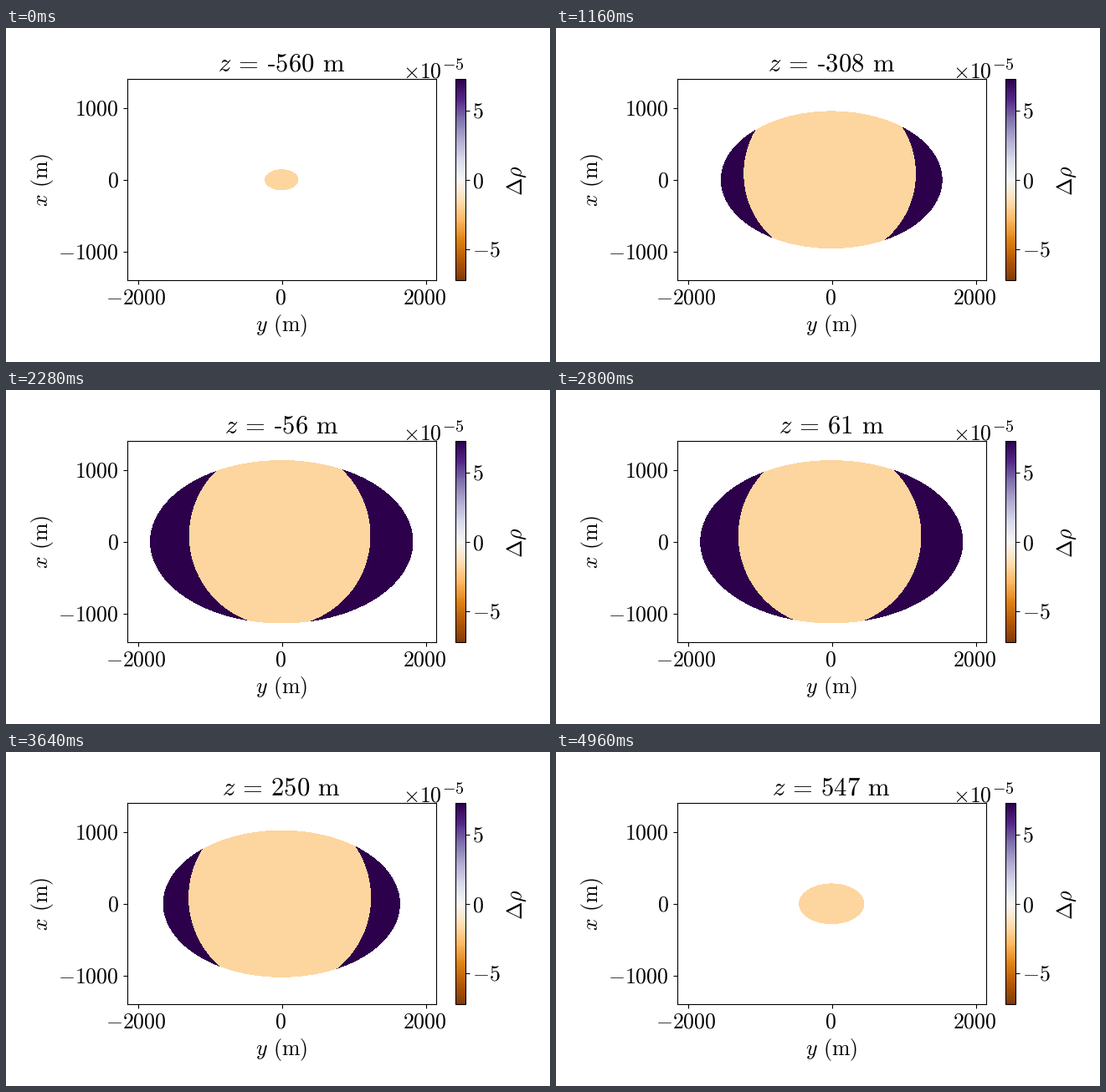
Recreate the animation shown at these times as a matplotlib script. Size 650x400 px, loop 5000 ms.

```python
import numpy as np
import matplotlib.pyplot as plt
from matplotlib.animation import FuncAnimation

W, H, DPI = 650, 400, 100
FRAMES, INTERVAL = 125, 40
Z_START, Z_STEP = -560, 9

AXES = (145.4, 61.2, 369, 241)        # left, top, width, height in pixels
BAR = (537.4, 61.2, 12, 241)
Y_LIM, X_LIM = 2150, 1400             # metres
BODY = (1841, 1141, 564.6)            # semi-axes along y, x, z
CORE = (-25, 86, 130)                 # centre along y, x, z
CORE_R = 1276
V_MAX = 7.25e-5
LIGHT, DARK = -1.85e-5, V_MAX
TEXT, TITLE, EXPONENT = 18.6, 22.1, 14.4

plt.rcParams["mathtext.fontset"] = "cm"
fig = plt.figure(figsize=(W / DPI, H / DPI), dpi=DPI, facecolor="white")


def add_axes(box):
    left, top, w, h = box
    return fig.add_axes((left / W, 1 - (top + h) / H, w / W, h / H))


def label(x, y, text, ha="center", size=TEXT, rotation=0):
    """Put text with its baseline at a pixel position measured from the top."""
    return fig.text(x / W, 1 - y / H, f"${text}$", ha=ha, va="baseline",
                    fontsize=size, rotation=rotation, rotation_mode="anchor")


def rm(text):
    return rf"\mathrm{{{text}}}"


def title_text(z):
    number = str(z).replace("-", "\u2010")
    return (r"z\hspace{0.18}=\hspace{0.18}" + rm(number)
            + r"\hspace{0.38}" + rm("m"))


yy, xx = np.meshgrid((np.arange(738) + 0.5) / 738 * 2 * Y_LIM - Y_LIM,
                     (np.arange(482) + 0.5) / 482 * 2 * X_LIM - X_LIM)
body_dist = (yy / BODY[0]) ** 2 + (xx / BODY[1]) ** 2
core_dist = (yy - CORE[0]) ** 2 + (xx - CORE[1]) ** 2


def density(z):
    """Density difference on the slice at height z; NaN outside the body."""
    in_core = core_dist + (z - CORE[2]) ** 2 <= CORE_R ** 2
    in_body = body_dist + (z / BODY[2]) ** 2 <= 1
    return np.where(in_body, np.where(in_core, LIGHT, DARK), np.nan)


ax = add_axes(AXES)
image = ax.imshow(density(Z_START), cmap="PuOr", vmin=-V_MAX, vmax=V_MAX,
                  origin="lower", interpolation="nearest", aspect="auto",
                  extent=(-Y_LIM, Y_LIM, -X_LIM, X_LIM))
ax.set_xticks([-2000, 0, 2000], labels=[""] * 3)
ax.set_yticks([-1000, 0, 1000], labels=[""] * 3)

bar = fig.colorbar(image, cax=add_axes(BAR))
bar.set_ticks([-5e-5, 0, 5e-5], labels=[""] * 3)

for x, text in ((155.8, "-2000"), (328, "0"), (500, "2000")):
    label(x, 330.3, rm(text))
for y, text in ((104.5, "1000"), (190.5, "0"), (276.5, "-1000")):
    label(135, y, rm(text), ha="right")
for y, text in ((107.5, "5"), (191, "0"), (274, "-5")):
    label(557.3, y, rm(text), ha="left")

unit = r"\hspace{0.38}" + rm("(m)")
label(329, 362.6, "y" + unit)
label(50, 182, "x" + unit, rotation=90)
label(617, 183, r"\Delta\rho", rotation=90)
label(473.5, 60, r"\times" + rm("10"), ha="left")
label(548, 50, rm("-5"), ha="right", size=EXPONENT)
title = label(329, 51.5, title_text(Z_START), size=TITLE)


def update(frame):
    z = Z_START + Z_STEP * max(0, frame - 1)
    image.set_data(density(z))
    title.set_text(f"${title_text(z)}$")
    return image, title


anim = FuncAnimation(fig, update, frames=FRAMES, interval=INTERVAL,
                     repeat=True, repeat_delay=0, blit=False)
plt.show()
```
